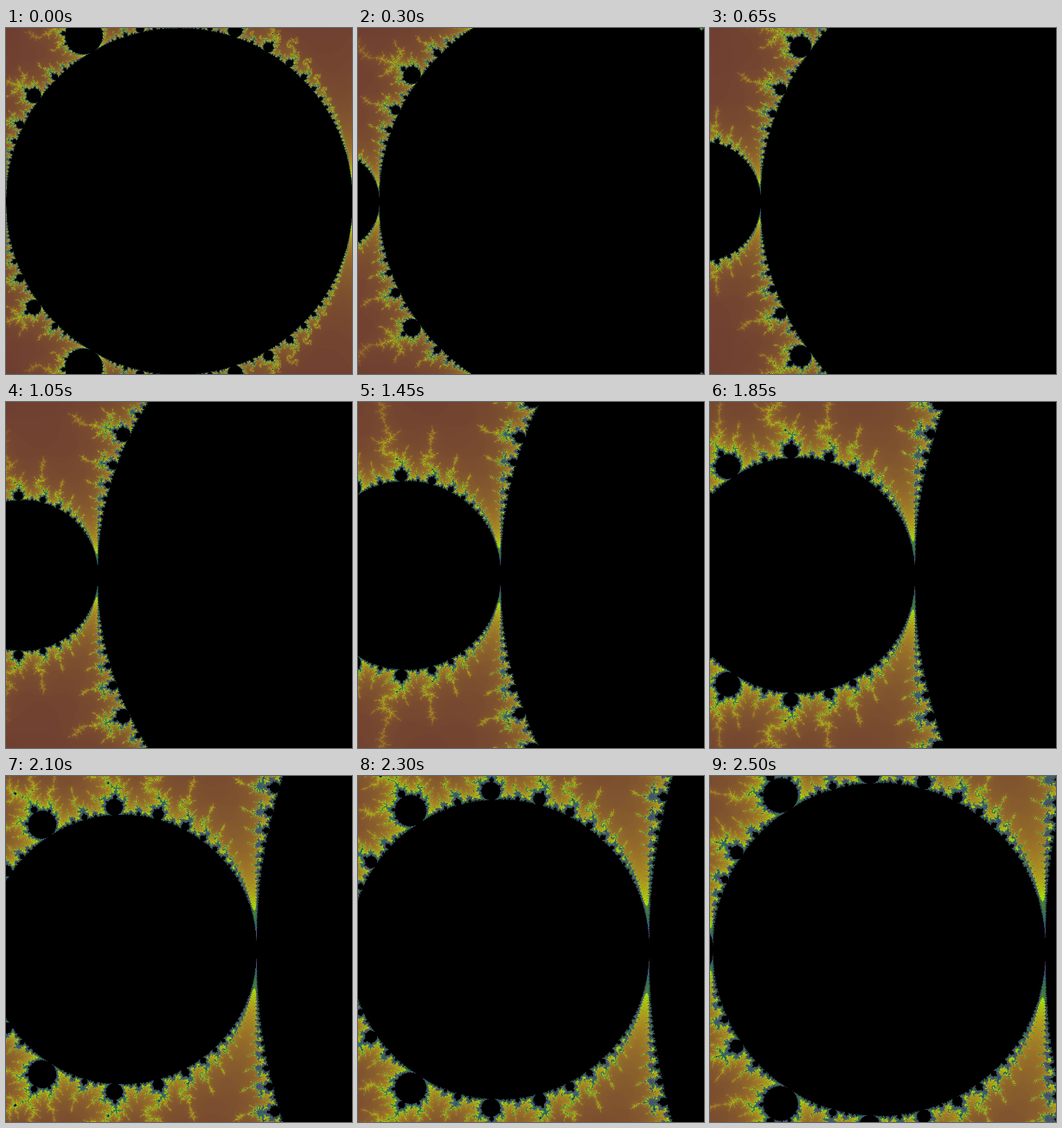
Animation of 400 by 400 pixels, one loop 2.55 s. Source, as an HTML page with a canvas:

```html
<!DOCTYPE html>
<html>
<head>
<meta charset="utf-8">
<style>
  html, body { margin: 0; overflow: hidden; background: #000; }
  canvas { display: block; }
</style>
</head>
<body>
<canvas id="stage" width="400" height="400"></canvas>
<script>
const SIZE = 400, HALF = SIZE / 2;
const STEP_MS = 50, STEPS = 51;
const MAX_ITER = 1000, TURN = 90;
const ctx = document.getElementById('stage').getContext('2d');

// Brown warms to lime up to TURN, then green, teal, blue and purple cycle
function colourAt(n) {
  if (n === MAX_ITER) return [0, 0, 0];
  if (n < TURN) {
    const u = n / TURN;
    return [108 + 68 * Math.sin(2.1 * u) ** 2, 55 + 180 * u ** 1.4, 50 - 46 * u * u];
  }
  const p = Math.log2(n / TURN);
  return [
    75 - 35 * Math.sin(2.4 * p),
    95 + 35 * Math.cos(1.8 * p),
    100 - 45 * Math.cos(2.4 * p)
  ];
}

const palette = Array.from({ length: MAX_ITER + 1 }, (_, n) => colourAt(n));

function escapeCount(cx, cy) {
  if ((cx + 1) ** 2 + cy * cy <= 0.0625) return MAX_ITER;
  let x = 0, y = 0, oldX = 0, oldY = 0, nextCheck = 8;
  for (let n = 0; n < MAX_ITER; n++) {
    const xx = x * x, yy = y * y;
    if (xx + yy > 4) return n;
    y = 2 * x * y + cy;
    x = xx - yy + cx;
    // An orbit that returns to itself never escapes
    if (Math.abs(x - oldX) < 1e-7 && Math.abs(y - oldY) < 1e-7) return MAX_ITER;
    if (n === nextCheck) {
      oldX = x;
      oldY = y;
      nextCheck *= 2;
    }
  }
  return MAX_ITER;
}

// The view closes 3% of the remaining way to its target at every step
function render(step) {
  const left = 0.97 ** step;
  const scale = (0.0178 + 0.4822 * left) / SIZE;
  const centre = -1.3934 + 0.3934 * left;
  const count = (col, row) => escapeCount(centre + (col - HALF) * scale, (HALF - row) * scale);

  const image = ctx.createImageData(SIZE, SIZE);
  const pixels = new Uint32Array(image.data.buffer);
  const above = new Int16Array(SIZE);
  for (let row = 0; row <= HALF; row++) {
    const start = row * SIZE;
    let before = 0;
    for (let col = 0; col < SIZE; col++) {
      const n = count(col, row);
      const isDetail = Math.abs(n - before) > 2 || Math.abs(n - above[col]) > 2;
      before = above[col] = n;
      let [r, g, b] = palette[n];
      if (isDetail) {
        r = g = b = 0;
        for (const dx of [-0.25, 0.25]) {
          for (const dy of [-0.25, 0.25]) {
            const part = palette[count(col + dx, row + dy)];
            r += part[0] / 4;
            g += part[1] / 4;
            b += part[2] / 4;
          }
        }
      }
      pixels[start + col] = 255 << 24 | b << 16 | g << 8 | r;
    }
    // The lower half mirrors the upper one
    if (row > 0) pixels.copyWithin((SIZE - row) * SIZE, start, start + SIZE);
  }
  return image;
}

const cache = [];
let shown = -1;

function draw() {
  const step = Math.floor(performance.now() / STEP_MS) % STEPS;
  if (step !== shown) {
    cache[step] ??= render(step);
    ctx.putImageData(cache[step], 0, 0);
    shown = step;
  }
  requestAnimationFrame(draw);
}
draw();
</script>
</body>
</html>
```
